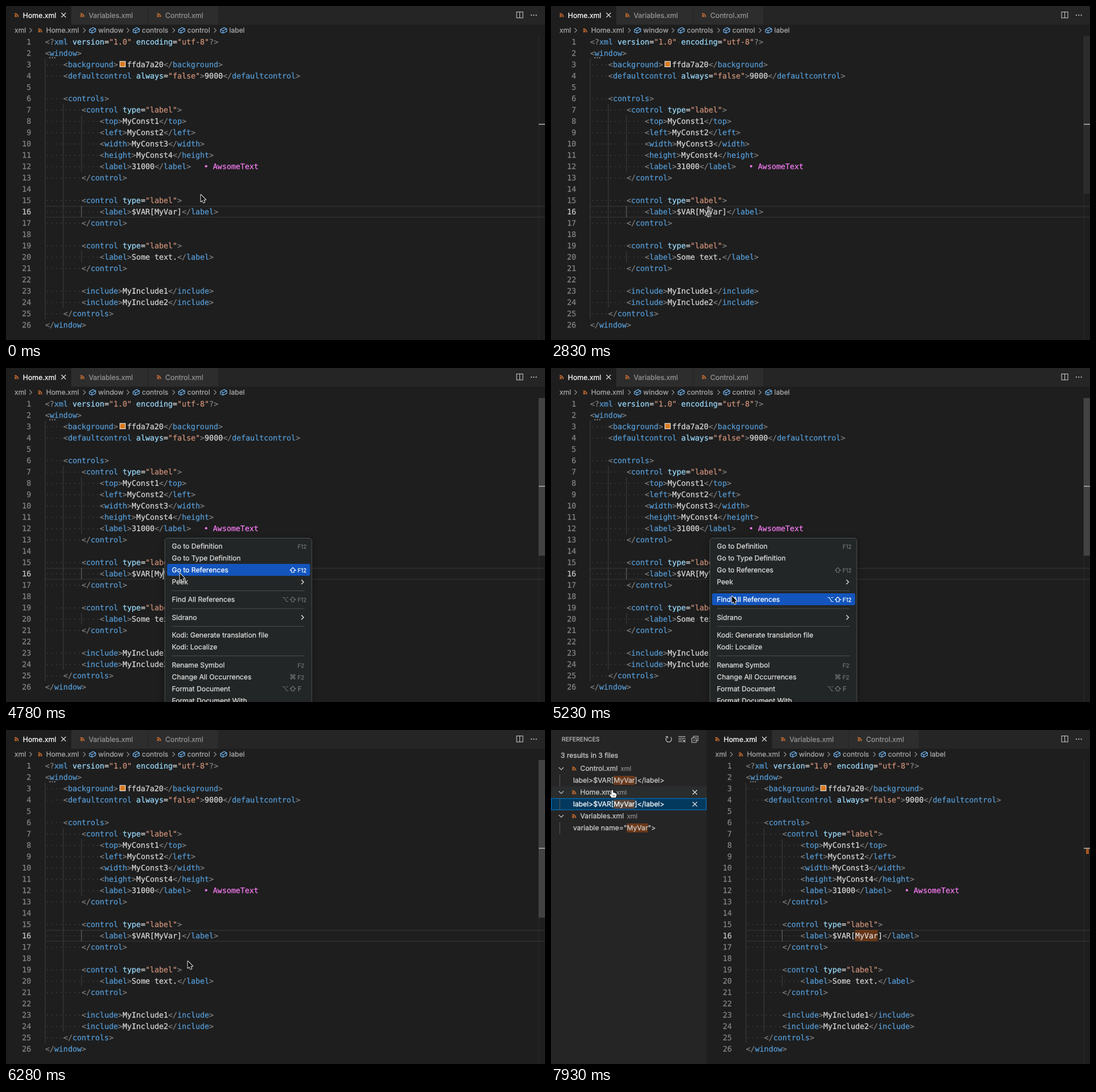
Animation of 950 by 590 pixels, one loop 8 s. Source, as an HTML page with a canvas:

```html
<!DOCTYPE html>
<html lang="en">
<head>
<meta charset="utf-8">
<title>Find all references</title>
<style>
html, body { margin: 0; width: 100%; height: 100%; overflow: hidden; background: #1e1e1e; }
canvas { display: block; }
</style>
</head>
<body>
<canvas id="stage" width="950" height="590"></canvas>
<script>
const ctx = document.getElementById('stage').getContext('2d');
const UI = 'Inter, "Open Sans", sans-serif';
const MONO = '13.34px "DejaVu Sans Mono", monospace';
const CHAR = 8.031, ROW = 20, LEFT = 69, PANEL = 274.5;
const ORANGE = '#e37933', MATCH = 'rgba(234,92,0,.35)', GUIDE = '#404040';

const code = `<?xml version="1.0" encoding="utf-8"?>
<window>
    <background>ffda7a20</background>
    <defaultcontrol always="false">9000</defaultcontrol>

    <controls>
        <control type="label">
            <top>MyConst1</top>
            <left>MyConst2</left>
            <width>MyConst3</width>
            <height>MyConst4</height>
            <label>31000</label>
        </control>

        <control type="label">
            <label>$VAR[MyVar]</label>
        </control>

        <control type="label">
            <label>Some text.</label>
        </control>

        <include>MyInclude1</include>
        <include>MyInclude2</include>
    </controls>
</window>`.split('\n');

// [label, centre y, modifiers, key]
const menuItems = [
  ['Go to Definition', 315, '', 'F12'], ['Go to Type Definition', 336],
  ['Go to References', 357, '⇧', 'F12'], ['Peek', 378, '>'],
  ['Find All References', 409, '⌥⇧', 'F12'], ['Sidrano', 440.5, '>'],
  ['Kodi: Generate translation file', 472], ['Kodi: Localize', 493],
  ['Rename Symbol', 524.5, '', 'F2'], ['Change All Occurrences', 545.5, '⌘', 'F2'],
  ['Format Document', 566.5, '⌥⇧', 'F'], ['Format Document With...', 587.5]
];

const modifierShapes = {
  '⇧': ['-5,.5 0,-4.5 5,.5 2.4,.5 2.4,4 -2.4,4 -2.4,.5 -5,.5'],
  '⌥': ['-5,-3.5 -2,-3.5 2,3.5 5,3.5', '1.2,-3.5 5,-3.5']
};

const results = [
  ['Control.xml', 'label>$VAR[', 'MyVar', ']</label>'],
  ['Home.xml', 'label>$VAR[', 'MyVar', ']</label>'],
  ['Variables.xml', 'variable name="', 'MyVar', '">']
];

// Pointer way-points: time, x, y
const path = [
  [1200, 343, 333], [2080, 278, 364], [4180, 278, 364], [4780, 306, 362.5],
  [5230, 318.5, 402.5], [5380, 320, 408], [6730, 320, 408], [6880, 251.5, 348.5],
  [7480, 96, 106], [7630, 96, 106], [7930, 108, 106]
];

// A hairline stroke gives glyphs the slightly heavier desktop smoothing
function text(str, x, y, color, font, align = 'left') {
  ctx.font = font;
  ctx.textAlign = align;
  ctx.fillStyle = ctx.strokeStyle = color;
  ctx.lineWidth = .25;
  ctx.fillText(str, x, y);
  ctx.strokeText(str, x, y);
  return x + ctx.measureText(str).width;
}
const label = (str, x, y, color, size = 12.2) =>
  text(str, x, y + size * .364, color, size + 'px ' + UI);

function rect(x, y, w, h, color) {
  ctx.fillStyle = color;
  ctx.fillRect(x, y, w, h);
}

// Strokes several polylines given as "x,y x,y" strings relative to (x, y)
function lines(x, y, color, width, ...polys) {
  ctx.strokeStyle = color;
  ctx.lineWidth = width;
  ctx.beginPath();
  for (const poly of polys)
    poly.split(' ').forEach((p, i) => {
      const [px, py] = p.split(',').map(Number);
      ctx[i ? 'lineTo' : 'moveTo'](x + px, y + py);
    });
  ctx.stroke();
}

const cross = (x, y) => lines(x, y, '#e0e0e0', 1.2, '-4,-4 4,4', '4,-4 -4,4');
const right = (x, y, color, width = 1.2) => lines(x, y, color, width, '-2,-4 2,0 -2,4');
const down = (x, y) => lines(x, y, '#c5c5c5', 1.1, '-4.2,-2 0,2.2 4.2,-2');
const cube = (x, y) => lines(x, y, '#75beff', 1.1,
  '-5.5,-1.5 1,-4.8 5.5,-2.6 5.5,1.8 -1,5 -5.5,2.8 -5.5,-1.5', '-5.5,-1.5 -1,.7 5.5,-2.6', '-1,.7 -1,5');

function fileIcon(x, y) {
  ctx.fillStyle = ctx.strokeStyle = ORANGE;
  ctx.lineWidth = 1.4;
  ctx.beginPath();
  ctx.arc(x - 2.2, y + 2.6, 1.1, 0, 7);
  ctx.fill();
  for (const r of [3.6, 6.4]) {
    ctx.beginPath();
    ctx.arc(x - 3.2, y + 3.6, r, -Math.PI / 2, 0);
    ctx.stroke();
  }
}

function drawTabs() {
  rect(0, 0, 950, 33, '#252526');
  rect(0, 0, 115, 33, '#1e1e1e');
  rect(115, 0, 134.5, 33, '#2d2d2d');
  rect(250.5, 0, 123.5, 33, '#2d2d2d');
  [['Home.xml', 30], ['Variables.xml', 146], ['Control.xml', 281]].forEach(([name, x], i) => {
    fileIcon(x - 11.5, 16);
    label(name, x - .3, 16, i ? '#959595' : '#fff', 12.4);
  });
  cross(101.5, 16);
}

function drawBreadcrumbs() {
  const grey = '#a9a9a9';
  label('xml', 15, 43, grey);
  fileIcon(60, 43);
  label('Home.xml', 70.7, 43, grey);
  [['window', 163], ['controls', 240], ['control', 320], ['label', 394]].forEach(([name, x]) => {
    cube(x - 10.5, 43);
    label(name, x - .5, 43, grey);
  });
  for (const x of [43.5, 138, 215, 295.5, 368.5]) right(x, 43, '#8c8c8c');
}

function drawLine(line, index) {
  const top = 53 + index * ROW, base = top + 14.7;
  const swatchCol = index === 2 ? 16 : 99;
  const at = col => LEFT + col * CHAR + (col >= swatchCol ? 15.9 : 0);
  text(index + 1, 44.3, base, index === 15 ? '#c6c6c6' : '#858585', MONO, 'right');
  let inTag = false, named = false;
  for (const m of line.matchAll(/<[\/?]?|\??>|"[^"]*"|=|\s+|[^<>"=\s?]+/g)) {
    const s = m[0];
    let color = '#d8d8d8';
    if (s[0] === ' ') {
      for (let i = 0; i < s.length; i++) rect(at(m.index + i) + 3.3, top + 10, 1.5, 1.5, '#444');
      continue;
    }
    if (s[0] === '<') { inTag = true; named = false; color = '#808080'; }
    else if (s.endsWith('>')) { inTag = false; color = '#808080'; }
    else if (inTag && s[0] === '"') color = '#ce9178';
    else if (inTag && s !== '=') { color = named ? '#9cdcfe' : '#569cd6'; named = true; }
    text(s, at(m.index), base, color, MONO);
  }
}

function drawCode(t) {
  const guide = (level, first, last, color = GUIDE) =>
    rect(LEFT + Math.round(level * 4 * CHAR) - .5, 33 + first * ROW, 1, (last - first + 1) * ROW, color);
  rect(LEFT, 353, 881, 1.6, '#2e2e2e');
  rect(LEFT, 372.3, 881, 1.6, '#2e2e2e');
  guide(0, 3, 25);
  guide(1, 7, 24);
  guide(2, 8, 12);
  guide(2, 16, 16, '#707070');
  guide(2, 20, 20);
  if (t >= 6580) rect(LEFT + 24 * CHAR - .5, 353, 5 * CHAR, 20, MATCH);
  code.forEach(drawLine);
  rect(200.2, 97.3, 10.7, 10.7, '#e8e8e8');
  rect(201.3, 98.4, 8.5, 8.5, '#da7a20');
  for (const x of [76.5, 80.8, 85]) rect(x, 90.5, 1.8, 1.8, '#a0a0a0');
  text('• AwsomeText', 348.8, 287.7, '#f87cf4', MONO);

  const caretOn = [[2830, 3280], [3730, 4330], [4780, 5230], [5830, 6280]].some(([a, b]) => t >= a && t < b);
  if (caretOn) rect(276.5, 353.5, 1.8, 20, '#c8c8c8');

  if (t >= 6430 && t < 7180) {
    ctx.globalAlpha = t < 7030 ? 1 : .5;
    for (const n of [2, 6, 7, 15, 19]) down(58.5, 43 + n * ROW);
    ctx.globalAlpha = 1;
  }
}

function drawRuler(t) {
  rect(938.5, 53, 1, 537, '#2c2c2c');
  if (t >= 6580) rect(943, 209, 5, 10, '#a4551f');
  if (t >= 2830 && t < 7930) {
    const fading = t < 2980 || t >= 7780;
    rect(939, 53, 11, 278.5, `rgba(121,121,121,${fading ? .15 : .4})`);
  }
  rect(939, 208, 11, 1.8, '#a0a0a0');
}

function drawEditorActions() {
  ctx.strokeStyle = '#c5c5c5';
  ctx.lineWidth = 1.1;
  ctx.strokeRect(900, 10.5, 11, 10.5);
  lines(905.5, 10.5, '#c5c5c5', 1.1, '0,0 0,10.5');
  for (const x of [925, 929.3, 933.6]) rect(x, 15.2, 1.9, 1.9, '#c5c5c5');
}

function drawPanel(t, mouse) {
  rect(0, 0, PANEL, 590, '#252526');
  label('REFERENCES', 19, 16, '#bbb', 10.4);
  const icon = '#c5c5c5';
  ctx.strokeStyle = icon;
  ctx.lineWidth = 1.2;
  ctx.beginPath();
  ctx.arc(207.5, 16.3, 5, -.9, 4);
  ctx.stroke();
  lines(203, 11, icon, 1.2, '-1,.5 2.6,.5 2.6,4');
  lines(224.5, 11.5, icon, 1.1, '0,0 12.5,0', '0,3 12.5,3', '0,6 7,6', '0,9 7,9', '8,5.5 12.5,10', '12.5,5.5 8,10');
  lines(248, 11, icon, 1.1, '0,3 8,3 8,11 0,11 0,3', '3,3 3,0 11,0 11,8 8,8', '2,7 6,7');
  if (t < 6580) return;

  label('3 results in 3 files', 17, 45, '#ccc');
  results.forEach(([file, before, match, after], i) => {
    const y = 68 + i * 42, ry = y + 21, selected = i === 1;
    const hovered = c => t >= 7030 && mouse.x < PANEL && Math.abs(mouse.y - c) < 10.5;
    if (hovered(y)) {
      rect(0, y - 10.5, PANEL, 21, '#2a2d2e');
      cross(253.5, y);
    }
    down(18, y);
    fileIcon(40.5, y);
    const end = label(file, 51.5, y, '#ccc');
    label('xml', end + 5.5, y + .3, '#8c8c8c', 11.2);

    if (selected) {
      rect(0, ry - 10.5, 274, 21, '#007fd4');
      rect(1, ry - 9.5, 272, 19, '#04395e');
    } else if (hovered(ry)) rect(0, ry - 10.5, PANEL, 21, '#2a2d2e');
    if (selected || hovered(ry)) cross(253.5, ry);
    if (selected || t >= 7030) rect(15, ry - 10.5, 1, 21, '#585858');
    const color = selected ? '#fff' : '#ccc';
    const start = label(before, 39, ry, color);
    rect(start, ry - 8, ctx.measureText(match).width, 16, MATCH);
    label(after, label(match, start, ry, color), ry, color);
  });
}

function drawMenu(mouse, alpha) {
  ctx.globalAlpha = alpha;
  ctx.save();
  ctx.shadowColor = 'rgba(0,0,0,.45)';
  ctx.shadowBlur = 12;
  ctx.shadowOffsetY = 3;
  ctx.fillStyle = '#232626';
  ctx.beginPath();
  ctx.roundRect(280, 300.5, 259, 330, 5);
  ctx.fill();
  ctx.restore();
  ctx.strokeStyle = '#505252';
  ctx.lineWidth = 1;
  ctx.stroke();
  for (const y of [393.5, 425, 456.5, 508.5]) rect(292.5, y - .5, 234, 1, '#4c4e4e');

  for (const [name, y, mods = '', key] of menuItems) {
    const active = mouse.x > 280 && Math.abs(mouse.y - y) <= 10.5;
    if (active) {
      ctx.fillStyle = '#1355bd';
      ctx.beginPath();
      ctx.roundRect(284, y - 11, 252, 21, 3);
      ctx.fill();
    }
    label(name, 292.3, y, active ? '#fff' : '#dedede');
    if (mods === '>') {
      right(522.5, y, '#d8d8d8', 1.5);
      continue;
    }
    const hint = active ? '#fff' : '#737575';
    [...mods].reverse().forEach((m, i) => {
      const x = 505.5 - i * 13;
      if (m in modifierShapes) lines(x, y, hint, 1.1, ...modifierShapes[m]);
      else text(m, x, y + 4.4, hint, '12px "DejaVu Sans", sans-serif', 'center');
    });
    if (key) label(key, 514, y + .5, hint, key === 'F' ? 12 : 9.8);
  }
  ctx.globalAlpha = 1;
}

function outlined(shape, fill, outline, width) {
  const p = new Path2D(shape);
  ctx.lineJoin = 'round';
  ctx.lineWidth = width;
  ctx.strokeStyle = outline;
  ctx.stroke(p);
  ctx.fillStyle = fill;
  ctx.fill(p);
  ctx.lineJoin = 'miter';
}

function drawPointer(t, { x, y }) {
  ctx.save();
  ctx.translate(x, y);
  if (t >= 2830 && t < 3730) {
    for (const [color, width] of [['#eee', 2.8], ['#111', 1.1]])
      lines(.5, 0, color, width, '-4,-7 -1.5,-6.5 0,-5 0,5 -1.5,6.5 -4,7', '4,-7 1.5,-6.5 0,-5', '4,7 1.5,6.5 0,5', '-2,1.5 2,1.5');
  } else if (x < PANEL && y > 57 && y < 184) {
    outlined('M-1.6 1Q0 -1 1.4 1V5Q3 4 4 5.4Q5.5 4.8 6 6.2Q7.6 6 7.4 8V10L6 13.5H-1L-4.5 9Q-4.8 7 -3 7.4L-1.6 8.6Z', '#fff', '#111', 1.8);
    lines(0, 0, '#222', .8, '1.6,8.5 1.6,11.5', '4,8.5 4,11.5');
  } else {
    outlined('M.5 .5V12.4L3.2 9.9L5.2 14.4L7.1 13.6L5.2 9.2H9Z', '#0a0a0a', '#e8e8e8', 2);
  }
  ctx.restore();
}

function pointerAt(t) {
  const next = path.findIndex(p => p[0] > t);
  if (next === 0) return { x: path[0][1], y: path[0][2] };
  const b = path[next < 0 ? path.length - 1 : next];
  const a = next < 0 ? b : path[next - 1];
  const k = next < 0 ? 0 : (t - a[0]) / (b[0] - a[0]);
  const e = k * k * (3 - 2 * k);
  return { x: a[1] + (b[1] - a[1]) * e, y: a[2] + (b[2] - a[2]) * e };
}

function draw(time) {
  // The picture advances in steps of 150 ms
  const base = time < 2090 ? 1350 : 2830;
  const t = base + Math.floor((time - base) / 150) * 150;
  const mouse = pointerAt(t);
  const panelOpen = t >= 6430;

  rect(0, 0, 950, 590, '#1e1e1e');
  ctx.save();
  if (panelOpen) ctx.translate(PANEL, 0);
  drawTabs();
  drawBreadcrumbs();
  drawCode(t);
  ctx.restore();
  drawRuler(t);
  drawEditorActions();
  if (panelOpen) drawPanel(t, mouse);
  if (t >= 3730 && t < 6130) drawMenu(mouse, t < 5980 ? 1 : .5);
  drawPointer(t, mouse);
}

ctx.textRendering = 'geometricPrecision';
function frame(now) {
  draw(now % 8000);
  requestAnimationFrame(frame);
}
requestAnimationFrame(frame);
</script>
</body>
</html>
```
